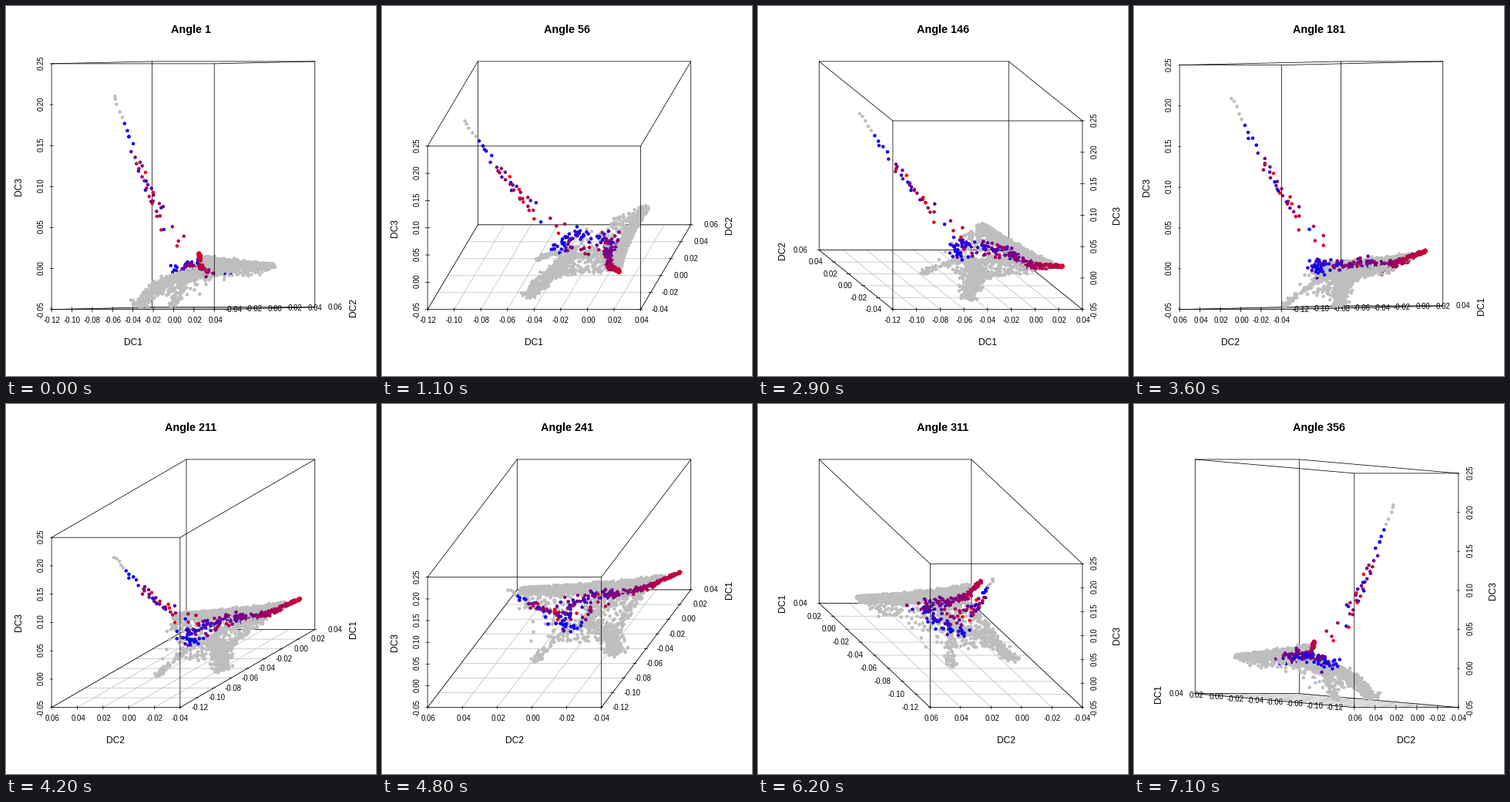
A matplotlib script for the animation above (7200 ms loop, 480 by 480 pixels).

```python
import matplotlib.pyplot as plt
import numpy as np
from matplotlib.animation import FuncAnimation
from matplotlib.collections import LineCollection

SIZE = 480
FRAMES, STEP, INTERVAL = 72, 5, 100
LEFT, RIGHT, TOP, BOTTOM = 59.11, 420.89, 71.91, 393.69
LABEL_W, SPACE_W = 21.35, 2.67
GREY = (190 / 255,) * 3
DOT = 4.5

# name, first tick, tick step, number of intervals
DC1 = ("DC1", -0.12, 0.02, 8)
DC2 = ("DC2", -0.04, 0.02, 5)
DC3 = ("DC3", -0.05, 0.05, 6)

plt.rcParams["font.family"] = "Liberation Sans"
rng = np.random.default_rng(11)


# Point coordinates are in tick units from the low end of each axis.
def along(path, t, spread):
    """Points at positions t on a polyline, with normal noise."""
    path = np.array(path)
    knots = np.linspace(0, 1, len(path))
    pts = np.column_stack([np.interp(t, knots, path[:, k]) for k in range(3)])
    return pts + rng.normal(size=pts.shape) * spread


def main_band(n):
    """The thick curved arm, thinning towards its far end."""
    y = rng.uniform(0.45, 4.42, n)
    u = rng.beta(1.2, 1.2, n)
    bend = np.clip(1 - y / 1.3, 0, 1)
    x0, x1 = 6.3 + 0.9 * bend, 6.65 + 0.55 * (1 - y / 4.4) ** 2
    z0, z1 = 0.92 + 0.4 * bend + 0.01 * y, 1.3 - 0.06 * y
    x = x0 + u * (x1 - x0) + rng.normal(0, 0.02, n)
    z = z0 + u * (z1 - z0) + rng.normal(0, 0.025, n)
    return np.column_stack([x, y, z])


def web(n, x_range, y_range, bias=1.0):
    """Loose points on the sheet that rises with x."""
    x = x_range[0] + (x_range[1] - x_range[0]) * rng.uniform(size=n) ** bias
    y = rng.uniform(*y_range, n)
    z = np.interp(x, [3.05, 3.6, 4.5, 6.4], [0.07, 0.1, 0.72, 0.95])
    return np.column_stack([x, y, z + rng.normal(0, 0.05, n)])


def red_blue(share, jitter, n):
    red = np.clip(share + rng.normal(0, jitter, n), 0, 1)
    return np.column_stack([red, np.zeros(n), 1 - red])


def build_points():
    grey = np.vstack([
        main_band(1500),
        web(150, (4.0, 6.3), (0.9, 2.1), 1.6),
        web(80, (4.0, 6.5), (0.8, 1.05)),
        web(80, (4.3, 6.3), (1.75, 2.15)),
        web(85, (4.0, 6.3), (2.0, 3.5)),
        web(50, (5.5, 6.4), (3.2, 4.25), 0.8),
        along([(3.57, 0.72, 0.08), (3.95, 0.92, 0.42), (4.3, 1.3, 0.66), (4.75, 2.1, 0.78)],
              rng.uniform(size=330), (0.15, 0.12, 0.05)),
        along([(3.05, 2.88, 0.07), (3.5, 2.75, 0.3), (4.1, 2.45, 0.6), (4.5, 2.2, 0.75)],
              rng.uniform(size=75), (0.08, 0.07, 0.03)),
    ])

    # sparse tail: grey outliers, then blue, then a red and blue mix
    t = np.linspace(0, 1, 44)
    tail = along([(0.3, 2.79, 5.2), (1.0, 2.7, 4.35), (1.75, 2.51, 3.48), (2.1, 2.47, 3.2),
                  (2.35, 2.38, 2.85), (2.85, 2.3, 2.5), (3.2, 2.3, 2.1), (4.6, 2.1, 1.4)],
                 t, np.outer(0.03 + 0.1 * t, (1, 1, 1.2)))
    tail_colors = red_blue(np.clip(1.8 * t - 0.25, 0.05, 0.55), np.where(t < 0.2, 0.05, 0.3), 44)
    tail_colors[t < 0.11] = GREY

    # red tip fading to purple, then a loose purple to blue cloud
    t = rng.uniform(size=190) ** 1.4
    arm = along([(7.18, 0.05, 1.36), (6.6, 0.83, 1.07), (6.35, 1.27, 0.97), (6.1, 1.9, 1.06)],
                t, (0.015 + 0.09 * t[:, None]))
    arm_colors = red_blue(0.77 - 0.35 * t, 0.07, len(arm))
    t = rng.uniform(size=85) ** 1.3
    cloud = along([(6.1, 2.0, 1.03), (5.6, 2.7, 1.02), (4.5, 2.6, 1.1), (3.95, 2.2, 0.87)],
                  t, (0.18, 0.2, 0.07))
    cloud_colors = red_blue(0.4 - 0.3 * t, 0.15, len(cloud))
    edge = rng.normal((5.1, 1.9, 1.0), (0.25, 0.15, 0.08), (10, 3))

    points = np.vstack([grey, tail, arm, cloud, edge])
    colors = np.vstack([np.tile(GREY, (len(grey), 1)), tail_colors, arm_colors,
                        cloud_colors, red_blue(0.65, 0.15, len(edge))])
    return points, colors


POINTS, COLORS = build_points()

fig = plt.figure(figsize=(SIZE / 72, SIZE / 72), dpi=72, facecolor="white")
ax = fig.add_axes([0, 0, 1, 1])


def segments(lines, color, z):
    ax.add_collection(LineCollection(lines, colors=[color], linewidths=0.75, snap=False,
                                     capstyle="round", zorder=z), autolim=False)


def write(x, y, s, size, ha="center", turn=0, weight="normal"):
    ax.text(x, y, s, fontsize=size, ha=ha, va="baseline", rotation=turn,
            rotation_mode="anchor", fontweight=weight, color="black", zorder=2)


def tick_labels(axis):
    """Label texts with the shift caused by padding to a common width."""
    _, first, step, n = axis
    for i in range(n + 1):
        value = round(first + i * step, 6) + 0.0
        yield i, f"{value:.2f}", 0 if value < 0 else SPACE_W


def draw(frame):
    ax.cla()
    ax.set(xlim=(0, SIZE), ylim=(SIZE, 0))
    ax.axis("off")

    angle = 1 + STEP * frame
    a = angle / 90
    lift = a if a < 1 else 4 - a if a > 3 else abs(2 - a)
    shear = 1 - a if a < 2 else a - 3
    swapped = a > 2
    z_right = 1 < a < 2 or a > 3
    leaning_back = 1 <= a <= 3

    x_axis, y_axis = (DC2, DC1) if swapped else (DC1, DC2)
    nx, ny, nz = x_axis[3], y_axis[3], DC3[3]
    lo, hi = min(0, shear * ny), nx + max(0, shear * ny)
    pad = (hi - lo) * LABEL_W / (RIGHT - LEFT)
    if leaning_back:
        lo -= pad
    else:
        hi += pad
    sx = (RIGHT - LEFT) / (hi - lo)
    sz = (BOTTOM - TOP) / (nz + lift * ny)

    def project(x, y, z):
        px = LEFT + (x + shear * y - lo) * sx
        return (SIZE - px if swapped else px), BOTTOM - (z + lift * y) * sz

    def edge(p, q):
        return [project(*p), project(*q)]

    # floor grid
    grid = [edge((i, 0, 0), (i, ny, 0)) for i in range(nx + 1)]
    grid += [edge((0, j, 0), (nx, j, 0)) for j in range(ny + 1)]
    segments(grid, GREY, 1)

    # axes, ticks and the box edges behind the points
    y_at, z_at = (0, nx) if leaning_back else (nx, 0)
    back = [
        edge((0, 0, 0), (nx, 0, 0)), edge((y_at, 0, 0), (y_at, ny, 0)),
        edge((z_at, 0, 0), (z_at, 0, nz)), edge((0, ny, 0), (nx, ny, 0)),
        edge((0, ny, nz), (nx, ny, nz)), edge((z_at, 0, 0), (z_at, ny, 0)),
        edge((0, 0, nz), (0, ny, nz)), edge((0, ny, 0), (0, ny, nz)),
        edge((nx, ny, 0), (nx, ny, nz)),
    ]
    tx, tz = 0.01 * nx, 0.01 * nz
    back += [edge((y_at - tx, j, 0), (y_at + tx, j, 0)) for j in range(ny + 1)]
    back += [edge((i, 0, -tz), (i, 0, tz)) for i in range(nx + 1)]
    back += [edge((z_at - tx, 0, k), (z_at + tx, 0, k)) for k in range(nz + 1)]
    segments(back, "black", 1.5)

    # tick labels
    for i, s, shift in tick_labels(x_axis):
        write(project(i, 0, 0)[0] + shift / 2, 410.9, s, 9.6)
    for k, s, shift in tick_labels(DC3):
        write(439.7 if z_right else 49, project(0, 0, k)[1] - shift / 2, s, 9.6, turn=90)
    for j, s, shift in tick_labels(y_axis):
        px, py = project(y_at, j, 0)
        if z_right:
            write(px - 14.4, py + 3.3, s, 9.6, ha="right")
        else:
            write(px + 14.4 + shift, py + 3.3, s, 9.6, ha="left")

    # axis names and title
    write(project(nx / 2, 0, 0)[0], 439.7, x_axis[0], 12)
    write(34.6 if z_right else 454.1, project(0, ny, 0)[1], y_axis[0], 12, turn=90)
    write(468.5 if z_right else 20.2, project(0, 0, nz / 2)[1], DC3[0], 12, turn=90)
    write(240, 34.7, f"Angle {angle}", 14.4, weight="bold")

    # far points first
    x, y, z = POINTS.T
    if swapped:
        x, y = y, x
    order = np.argsort(-y)
    px, py = project(x, y, z)
    ax.scatter(px[order], py[order], s=DOT ** 2, c=COLORS[order], linewidths=0, zorder=3)

    # box edges in front
    segments([
        edge((0, 0, nz), (nx, 0, nz)), edge((nx, 0, nz), (nx, ny, nz)),
        edge((y_at, 0, 0), (y_at, 0, nz)),
    ], "black", 4)
    return []


anim = FuncAnimation(fig, draw, frames=FRAMES, interval=INTERVAL,
                     init_func=lambda: [], repeat=True, repeat_delay=0, blit=False)
plt.show()
```
